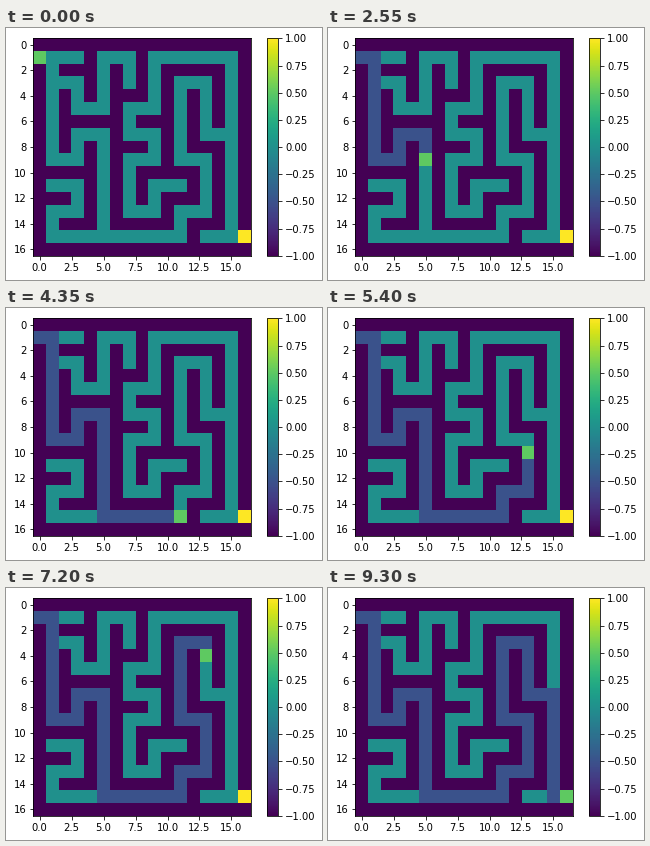
Animation of 316x252 px, one loop 9450 ms. Source, as a matplotlib script:

```python
import matplotlib.pyplot as plt
import numpy as np
from matplotlib.animation import FuncAnimation

W, H, DPI = 316, 252, 72
SIDE = 217.44
LEFT, BOTTOM = 27.2, 24.2

MAZE = """
.................
####.###.#######.
.#...#.#.#.....#.
.###.#.#.#.###.#.
.#.#.#...#.#.#.#.
.#.###.###.#.#.#.
.#.....#...#.#.#.
.#.###.###.#.###.
.#.#.#...#.#...#.
.###.#.###.###.#.
.....#.#.....#.#.
.###.#.#.###.#.#.
...#.#.#.#...#.#.
.###.#.###.###.#.
.#...#.....#...#.
.###########.####
.................
""".split()

# Corners of the walk as (row, column)
CORNERS = [(1, 0), (1, 1), (9, 1), (9, 3), (7, 3), (7, 5), (15, 5), (15, 11),
           (13, 11), (13, 13), (9, 13), (9, 11), (3, 11), (3, 13), (7, 13),
           (7, 15), (15, 15), (15, 16)]

WALL, VISITED, OPEN, AGENT, GOAL = -1, -0.5, 0, 0.5, 1


def walk(corners):
    cells = [corners[0]]
    for (r0, c0), (r1, c1) in zip(corners, corners[1:]):
        dr, dc = np.sign(r1 - r0), np.sign(c1 - c0)
        for k in range(1, abs(r1 - r0) + abs(c1 - c0) + 1):
            cells.append((r0 + k * dr, c0 + k * dc))
    return cells


def add_axes(x, y, w, h):
    return fig.add_axes([x / W, y / H, w / W, h / H])


path = walk(CORNERS)
base = np.array([[OPEN if ch == "#" else WALL for ch in row] for row in MAZE],
                dtype=float)
base[path[-1]] = GOAL


def state(step):
    grid = base.copy()
    for cell in path[:step]:
        grid[cell] = VISITED
    grid[path[step]] = AGENT
    return grid


plt.rcParams.update({"font.family": "DejaVu Sans", "font.size": 10})
fig = plt.figure(figsize=(W / DPI, H / DPI), dpi=DPI, facecolor="white")

ax = add_axes(LEFT, BOTTOM, SIDE, SIDE)
img = ax.imshow(state(0), cmap="viridis", vmin=-1, vmax=1,
                interpolation="nearest", aspect="auto")
ax.set_xticks(np.arange(0, 16, 2.5))
ax.xaxis.set_major_formatter("{x:.1f}")
ax.set_yticks(range(0, 17, 2))

cax = add_axes(LEFT + SIDE + 16.74, BOTTOM, SIDE / 20, SIDE)
bar = fig.colorbar(img, cax=cax, ticks=np.linspace(-1, 1, 9))
bar.ax.set_yticklabels([f"{v:.2f}".replace("-", "\u2212")
                        for v in np.linspace(-1, 1, 9)])


def update(step):
    img.set_data(state(step))
    return [img]


anim = FuncAnimation(fig, update, frames=len(path), interval=150,
                     repeat=True, repeat_delay=0)
plt.show()
```
